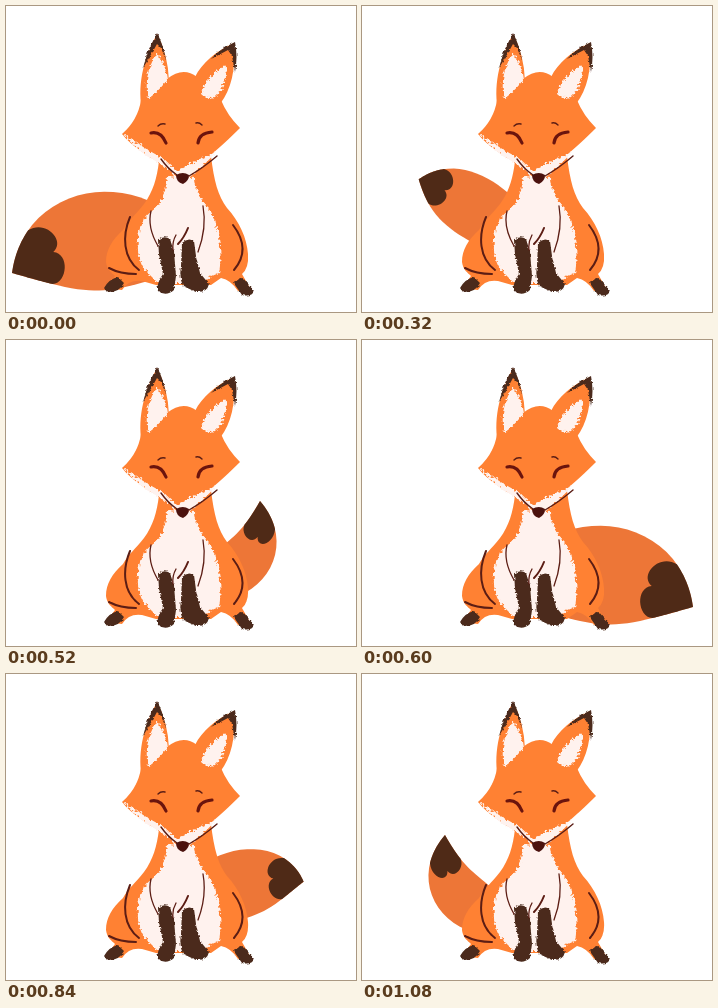
An HTML page for the animation above (1.16 s loop, 350 px wide and 306 px high).

```html
<!DOCTYPE html>
<html lang="en">
<head>
<meta charset="utf-8">
<title>Fox wagging its tail</title>
<style>
html, body { margin: 0; width: 100%; height: 100%; overflow: hidden; background: #fff; }
svg { display: block; }
.fur { fill: #ff8133; }
.white { fill: #fff2ee; filter: url(#chalk); }
.dark { fill: #4b2a1b; filter: url(#rough); }
.line { fill: none; stroke: #5c1d14; stroke-linecap: round; stroke-linejoin: round; }
</style>
</head>
<body>
<svg width="350" height="306" viewBox="0 0 350 306">
  <defs>
    <filter id="chalk" x="-20%" y="-20%" width="140%" height="140%">
      <feTurbulence type="fractalNoise" baseFrequency=".35" numOctaves="2" seed="4"/>
      <feDisplacementMap in="SourceGraphic" scale="6" xChannelSelector="R" yChannelSelector="G"/>
    </filter>
    <filter id="rough" x="-20%" y="-20%" width="140%" height="140%">
      <feTurbulence type="fractalNoise" baseFrequency=".4" numOctaves="2" seed="9"/>
      <feDisplacementMap in="SourceGraphic" scale="3" xChannelSelector="R" yChannelSelector="G"/>
    </filter>
  </defs>

  <g id="wag">
    <path id="tail" fill="#ed7637"/>
    <path id="tip" fill="#4f2a17"/>
  </g>

  <!-- body -->
  <path class="fur" d="M153 155C151 172 147 186 138 198C129 210 123 213 117 224C106 234 100 244 100 256C101 264 106 267 109 270L100 282L116 284Q123 273 136 275L150 279H205L215 272Q225 274 232 285L245 284L236 268Q243 262 242 248C241 232 233 215 221 202C212 190 208 175 205 150Z"/>
  <path class="white" d="M161 170C160 188 156 198 146 205C130 216 127 246 139 264L152 277H190L213 267C217 246 213 218 203 203C194 194 190 186 189 172Z"/>
  <path class="dark" d="M152 234Q158 229 164 233L168 246L170 270L168 284Q160 291 152 285Q150 278 157 268L153 248Z
    M176 237Q182 231 188 235L190 250L194 267L203 278Q201 287 190 286L177 280Q173 272 175 260Z
    M98 282Q103 273 112 271L118 277Q113 287 101 286Z
    M227 276L237 272L248 285Q246 291 236 289Z"/>
  <g class="line" stroke-width="1.3">
    <path d="M145 205Q141 221 152 240M197 200Q201 222 192 246M170 229Q166 236 167 244"/>
    <path stroke-width="2" d="M182 222Q178 232 172 238M124 211C116 230 117 252 133 264M227 219C240 236 239 251 228 264M103 262Q114 268 130 268"/>
  </g>

  <!-- ears and head -->
  <path class="fur" d="M151 28C141 47 132 70 135 98L163 75Q162 48 151 28ZM228 37C210 45 196 57 189 71L214 98Q231 76 228 37Z"/>
  <path class="dark" d="M151 27L142 45L137 62L146 47L151 38L155 42L160 54Q157 38 151 27ZM229 36Q214 43 205 53L222 44L226 50L229 66Q232 51 229 36Z"/>
  <path class="fur" d="M135 94C141 82 151 77 161 73Q177 60 191 71Q207 79 215 94Q221 109 234 122C225 131 212 143 200 153L177 173L156 159C142 149 127 142 116 128Q132 114 135 94Z"/>
  <path class="white" d="M151 47C141 62 139 78 142 93Q153 85 161 74Q159 56 151 47ZM221 59C207 65 198 77 195 88Q201 94 209 91Q221 80 221 59Z"/>
  <path class="white" d="M117 127Q130 137 142 144L158 153L171 165L191 154L210 146Q199 159 184 171L171 171L156 159Q132 147 117 127Z"/>
  <g class="line" stroke-width="1.4">
    <path d="M155 153Q162 163 171 169M183 170Q197 162 211 150"/>
    <path stroke="#6b140d" stroke-width="3.2" d="M145 127Q155 125 160 137M192 137Q193 127 206 126"/>
    <path d="M152 120Q155 117 159 118M190 117Q193 116 196 119"/>
  </g>
  <path fill="#4b120e" d="M170 169Q177 165 183 169Q183 175 177 178Q170 176 170 169Z"/>
</svg>
<script>
const LOOP = 1160, HALF = 600, TICK = 40, MIRROR = 337;
const ROOT = [173, 245];
// Bend and tip of the tail's spine at points of one sweep from left to right.
const sweep = [
  {at: 0, bend: [84, 216], tip: [6, 267]},
  {at: .3, bend: [86, 197], tip: [22, 242]},
  {at: .6, bend: [112, 185], tip: [74, 139]},
  {at: .7, bend: [239, 212], tip: [205, 110]},
  {at: .9, bend: [262, 240], tip: [254, 161]}
];
const get = id => document.getElementById(id);
const mix = (a, b, t) => a.map((v, i) => v + (b[i] - v) * t);

function spineAt(p) {
  const i = Math.max(1, sweep.findIndex(k => k.at >= p - 1e-6));
  const a = sweep[i - 1], b = sweep[i], t = (p - a.at) / (b.at - a.at);
  return [mix(a.bend, b.bend, t), mix(a.tip, b.tip, t)];
}

function drawTail(p) {
  const [bend, tip] = spineAt(p);
  const girth = 28 + 26 * (1 - p) ** 2; // fluffy at rest, slim in motion

  // s runs from root to tip, side from -1 to 1 across the tail.
  function point(s, side) {
    const a = mix(ROOT, bend, s), b = mix(bend, tip, s), [x, y] = mix(a, b, s);
    const dx = b[0] - a[0], dy = b[1] - a[1];
    const w = side * girth * (1 - s ** 4) * (1 - .55 * (1 - s) ** 4) / Math.hypot(dx, dy);
    return [x - dy * w, y + dx * w];
  }
  function outline(from) {
    const s = Array.from({length: 25}, (_, i) => from + (1 - from) * i / 24);
    return [...s.map(v => point(v, 1)), ...s.reverse().map(v => point(v, -1))].join('L');
  }
  const dark = .82, notch = point(.74, 0);
  get('tail').setAttribute('d', `M${outline(0)}Z`);
  get('tip').setAttribute('d', `M${outline(dark)}` +
    `C${point(.72, -.85)} ${point(.65, -.15)} ${notch}` +
    `C${point(.65, .15)} ${point(.72, .85)} ${point(dark, 1)}Z`);
}

// Each sweep has ten drawings; the way back is mirrored and slightly quicker.
function frame() {
  const t = performance.now() % LOOP, back = t >= HALF;
  const n = Math.floor((back ? t - HALF : t) / TICK);
  const drawing = Math.floor(back ? n * 3 / 4 : (2 * n + 1) / 3);
  get('wag').setAttribute('transform', back ? `matrix(-1 0 0 1 ${MIRROR} 0)` : '');
  drawTail(drawing / 10);
  requestAnimationFrame(frame);
}
frame();
</script>
</body>
</html>
```
